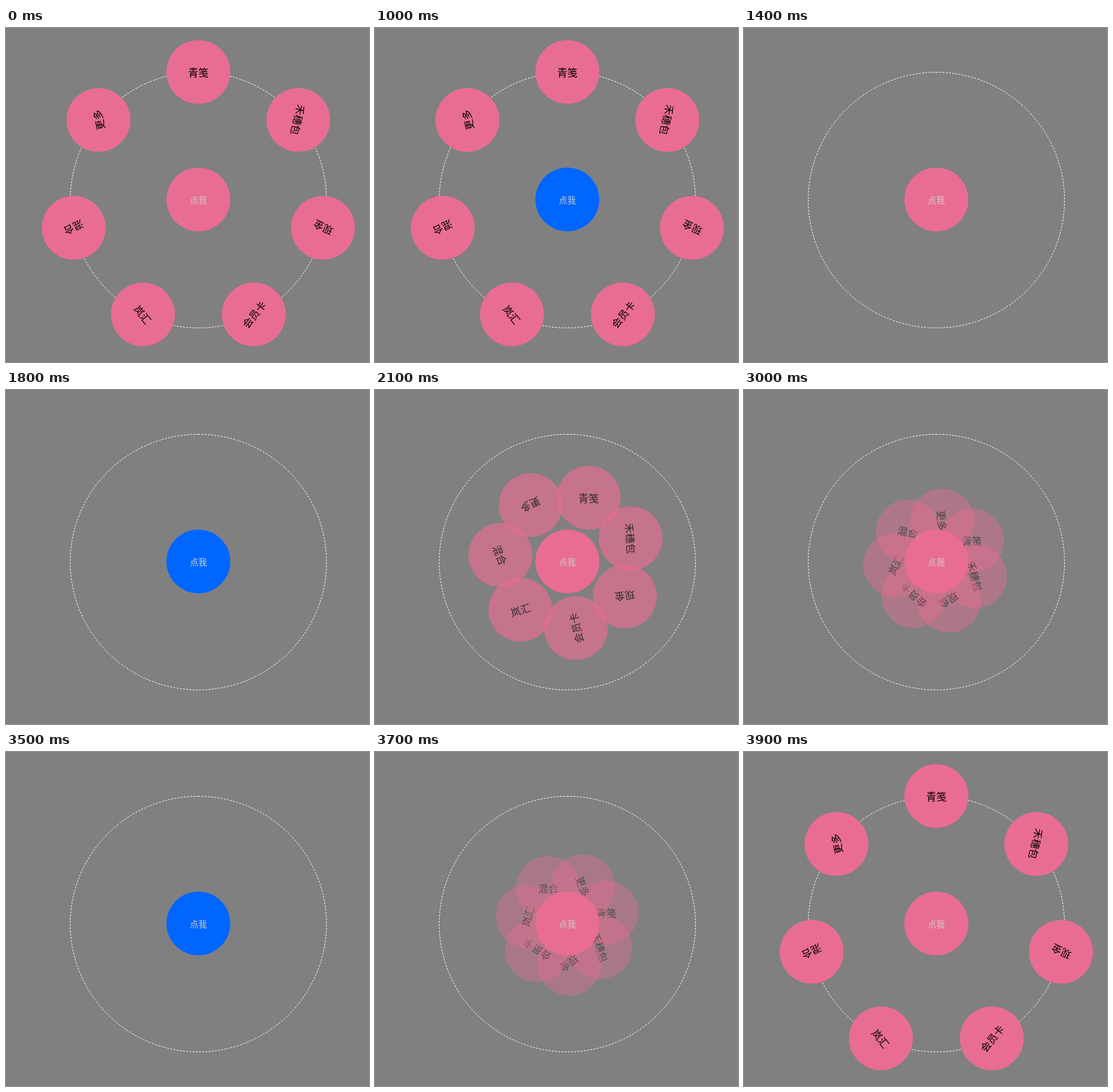
Recreate the animation shown at these times as an HTML page. Size 568 by 524 pixels, loop 4.5 s.

```html
<!DOCTYPE html>
<html lang="zh-CN">
<head>
<meta charset="utf-8">
<style>
  html, body { margin: 0; width: 100%; height: 100%; overflow: hidden; background: #808080; }
  body { position: relative; font: 16px "Noto Sans CJK SC", "Noto Sans CJK", sans-serif; }
  svg { position: absolute; left: 0; top: 0; }
  .disc {
    position: absolute; left: 251px; top: 219px; width: 100px; height: 100px;
    border-radius: 50%; background: #e96d92; color: #000;
    line-height: 100px; text-align: center; white-space: nowrap;
  }
  .button { color: #ccc; font-size: 13.33px; line-height: 102px; }
  .button.pressed { background: #06f; }
</style>
</head>
<body>
<svg width="568" height="524">
  <circle id="ring" r="200.5" transform="translate(301 270) rotate(-90)" fill="none" stroke="#fff"/>
</svg>
<script>
  const LOOP = 4500, TICK = 100, FADE = 300;
  const labels = ["青笺", "禾穗包", "现金", "会员卡", "岚汇", "混合", "更多"];
  const step = 360 / labels.length;
  const presses = [[1000, 1100], [1800, 2000], [2800, 2900], [3500, 3600]];
  // Start time of each linear move and the state it leads to (1 = hidden)
  const moves = [[1022, 1], [1900, 0], [2833, 1], [3583, 0]];

  // Dashes begin and end at the top, so the last one touches the first
  const DASH = 3, DASHES = 252;
  const gap = (2 * Math.PI * 200.5 - DASH * DASHES) / (DASHES - 1);
  document.getElementById("ring").setAttribute("stroke-dasharray", `${DASH} ${gap}`);

  function addDisc(text, extra = "") {
    const el = document.createElement("div");
    el.className = "disc " + extra;
    el.textContent = text;
    document.body.append(el);
    return el;
  }

  const items = labels.map(text => addDisc(text));
  const button = addDisc("点我", "button");

  function hiddenAmount(t) {
    let amount = 0;
    for (const [start, end] of moves) {
      const p = Math.min(1, Math.max(0, (t - start) / FADE));
      amount += (end - amount) * p;
    }
    return amount;
  }

  function draw(t) {
    const u = hiddenAmount(t);
    items.forEach((el, i) => {
      const turn = i * step;
      el.style.opacity = 1 - u;
      el.style.transform = `rotate(${turn}deg) translate(${100 * u}px, ${300 * u - 200}px) rotate(${turn * (1 - u)}deg)`;
    });
    button.classList.toggle("pressed", presses.some(([from, to]) => t >= from && t < to));
  }

  const began = performance.now();
  function frame() {
    const t = (performance.now() - began) % LOOP;
    draw(Math.floor(t / TICK) * TICK);
    requestAnimationFrame(frame);
  }
  frame();
</script>
</body>
</html>
```
